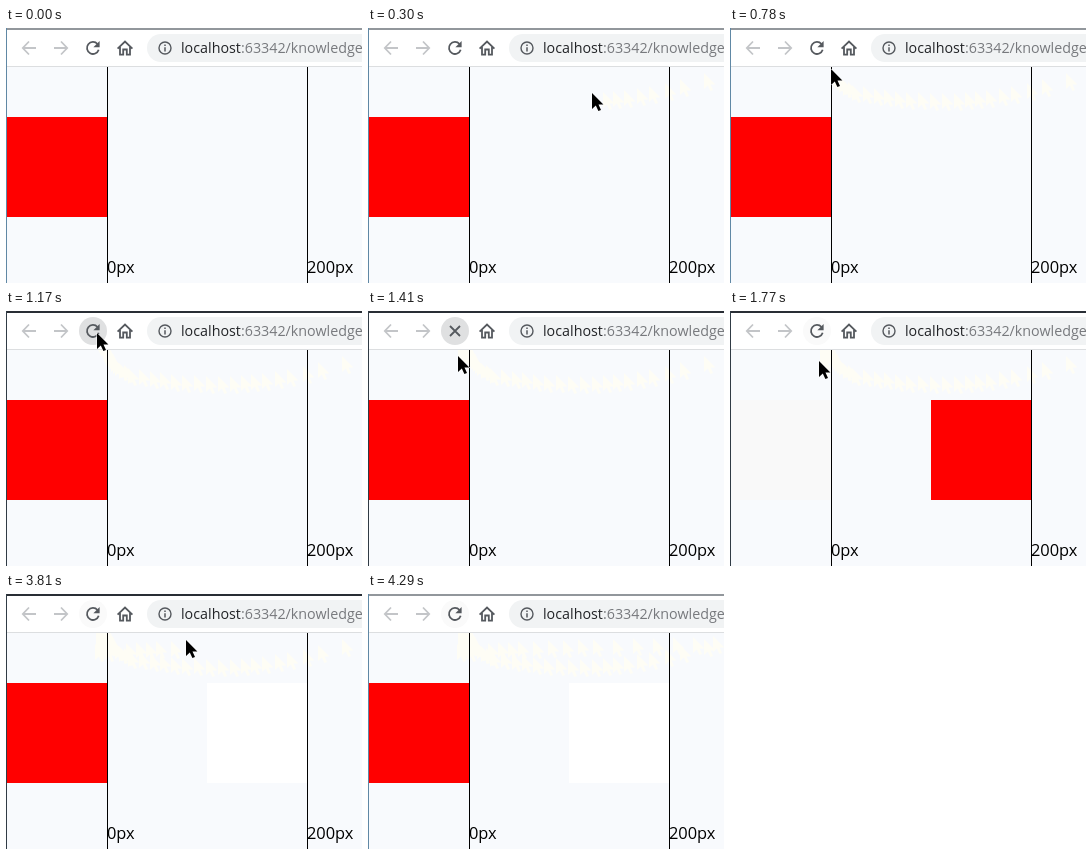
Animation of 356x255 px, one loop 4.38 s. Source, as an HTML page:

```html
<!DOCTYPE html>
<html lang="en">
<head>
<meta charset="utf-8">
<title>Square moving by 200px</title>
<style>
html, body { margin: 0; width: 100%; height: 100%; overflow: hidden; background: #f8fafd; }
svg { display: block; width: 356px; height: 255px; }
text { font-family: "Open Sans", "Noto Sans", sans-serif; }
.label { font-size: 16.4px; }
.url { font-size: 14.3px; fill: #77797d; }
.icon { fill: none; stroke: #55595e; stroke-width: 1.8; }
.off { stroke: #c3c5c8; }
</style>
</head>
<body>
<svg viewBox="0 0 356 255">
  <defs>
    <path id="arrow" d="M0 0V16L3.8 12.6L6.4 18L9 16.9L6.5 11.6H11.4Z"/>
  </defs>
  <rect width="356" height="255" fill="#f8fafd"/>
  <g id="trail" fill="#fefdf5"></g>
  <rect id="patch" y="89" width="100" height="100"/>
  <rect id="square" y="89" width="100" height="100" fill="#f00"/>
  <path d="M101.5 39V255M301.5 39V255" stroke="#000"/>
  <text class="label" x="101" y="245">0px</text>
  <text class="label" x="301" y="245">200px</text>

  <rect width="356" height="38" fill="#fff"/>
  <rect y="38" width="356" height="1" fill="#dcdee0"/>
  <rect id="top" width="356" height="2"/>
  <rect id="side" width="1" height="255"/>
  <path class="icon off" d="M30 20H17M23 13.5L16.8 20L23 26.5"/>
  <path class="icon off" d="M48 20H61M55 13.5L61.2 20L55 26.5"/>
  <circle id="disc" cx="87" cy="20" r="14"/>
  <g id="reload">
    <path class="icon" d="M91.5 16A6 6 0 1 0 92.7 21.8"/>
    <path d="M93.6 13V19.2H87.4Z" fill="#55595e"/>
  </g>
  <path id="stop" class="icon" d="M82 15L92 25M92 15L82 25"/>
  <path class="icon" d="M111.6 20.6L119 13.6L126.4 20.6M114 19V26.6H117.2V21.5H120.8V26.6H124V19"/>
  <rect x="141" y="6" width="240" height="28" rx="14" fill="#f1f3f4"/>
  <circle cx="159" cy="20" r="6" class="icon" style="stroke-width:1.4"/>
  <path d="M159 16.4V18M159 19.2V23.6" class="icon" style="stroke-width:1.5"/>
  <text class="url" x="175" y="25"><tspan fill="#222427">localhost</tspan>:63342/knowledge</text>
  <use id="cursor" href="#arrow" stroke="#fff" stroke-width="1" paint-order="stroke"/>
</svg>
<script>
const LOOP = 4380, STEP = 30, ENTER = 60, LEAVE = 4110;
const $ = id => document.getElementById(id);

// Pointer path: time, x, y
const path = [
  [60, 336, 45], [90, 312, 51], [150, 281, 58], [210, 256, 62],
  [300, 224, 65], [420, 176, 64], [570, 122, 57], [660, 109, 49],
  [780, 101, 41], [1050, 91, 22], [1260, 91, 22], [1410, 90, 45],
  [1470, 89, 50], [3570, 89, 50], [3750, 150, 47], [3900, 225, 45],
  [4080, 345, 42]
];

function pointer(t) {
  const i = path.findIndex(p => p[0] >= t);
  if (i < 0) return path[path.length - 1].slice(1);
  if (i === 0) return path[0].slice(1);
  const a = path[i - 1], b = path[i];
  const k = (t - a[0]) / (b[0] - a[0]);
  return [1, 2].map(n => a[n] + (b[n] - a[n]) * k);
}

function place(el, [x, y]) {
  el.setAttribute("transform", `translate(${Math.round(x)} ${Math.round(y)})`);
}

const show = (el, on) => el.setAttribute("visibility", on ? "visible" : "hidden");

// Faint marks stay behind wherever the pointer has been
const marks = [];
for (let t = ENTER; t < LEAVE; t += STEP) {
  if (t > 1470 && t < 3600) continue;
  const el = document.createElementNS("http://www.w3.org/2000/svg", "use");
  el.setAttribute("href", "#arrow");
  place(el, pointer(t));
  $("trail").append(el);
  marks.push({ t, el });
}

function draw(time) {
  const t = Math.floor(time % LOOP / STEP) * STEP;
  const within = (a, b) => t >= a && t < b;
  const active = within(1170, 4290);
  const moved = within(1470, 3300);
  const loading = within(1260, 1770);

  $("top").setAttribute("fill", active ? "#292e35" : "#92979c");
  $("side").setAttribute("fill", active ? "#303b45" : "#6088a5");
  $("square").setAttribute("x", moved ? 201 : 1);
  $("patch").setAttribute("x", moved ? 1 : 201);
  $("patch").setAttribute("fill", moved ? "#f9f9f9" : "#fff");
  show($("patch"), t >= 1470);

  $("disc").setAttribute("fill", t < 1770 ? "#dfe0e1" : "#fafafa");
  show($("disc"), t >= 1170);
  show($("stop"), loading);
  show($("reload"), !loading);

  show($("cursor"), within(ENTER, LEAVE));
  place($("cursor"), pointer(t));
  for (const m of marks) show(m.el, m.t < t);
}

const start = performance.now();
function tick() {
  draw(performance.now() - start);
  requestAnimationFrame(tick);
}
tick();
</script>
</body>
</html>
```
